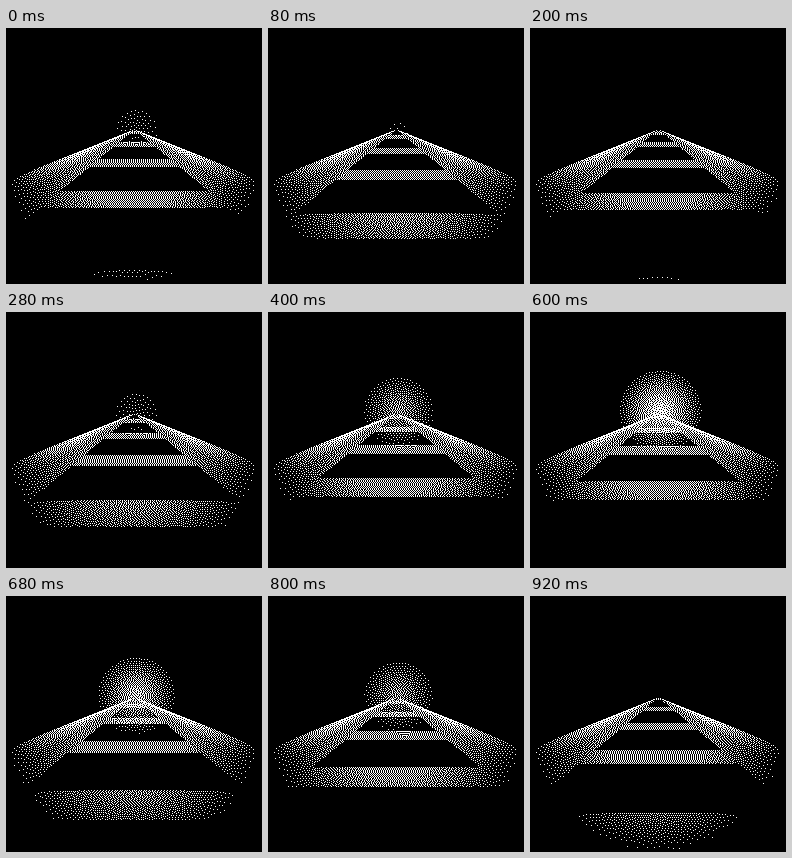
An HTML page with a canvas for the animation above (960 ms loop, 256 by 256 pixels).

```html
<!DOCTYPE html>
<html lang="en">
<head>
<meta charset="utf-8">
<title>Night track</title>
<style>
  html, body { margin: 0; width: 100%; height: 100%; overflow: hidden; background: #000; }
  canvas { display: block; width: 100vw; height: 100vh; image-rendering: pixelated; }
</style>
</head>
<body>
<canvas id="stage" width="256" height="256"></canvas>
<script>
const SIZE = 256, LOOP = 960, STEP = 40;
const ctx = document.getElementById("stage").getContext("2d");
const image = ctx.createImageData(SIZE, SIZE);
const pixels = new Uint32Array(image.data.buffer);
const BLACK = 0xff000000, WHITE = 0xffffffff;

// Lamp brightness as [ms, level]
const LAMP = [[0, .12], [120, 0], [240, 0], [400, .5], [480, .88], [600, .88],
              [680, .7], [800, .48], [920, 0], [960, .12]];

const clamp = v => Math.max(0, Math.min(1, v));

function lampLevel(ms) {
  const i = LAMP.findIndex(key => key[0] > ms);
  const [t0, a] = LAMP[i - 1], [t1, b] = LAMP[i];
  return a + (b - a) * (ms - t0) / (t1 - t0);
}

// Brightness of the ground: two fans of rails with sleepers between them
function ground(x, y, phase) {
  if (y <= 101) return 0;
  const fade = clamp((130 - Math.hypot(x - 127, y - 126)) / 75);
  const slope = (y - 101) / Math.abs(x - 128);
  if (slope < .4) return 0;
  if (slope < .835) return fade * Math.max(.43, .9 - (slope - .4) * 2.4);
  const depth = phase - 256 / (y - 55);
  return depth - Math.floor(depth) < .33 ? fade * .5 : 0;
}

function brightness(x, y, phase, lamp) {
  const radius = 46 * lamp ** .25;
  const glow = lamp && lamp * clamp(1 - Math.hypot(x - 130, y - 98) / radius);
  return 1 - (1 - ground(x, y, phase)) * (1 - glow);
}

// Stipple the light in pure black and white by spreading the rounding error,
// row by row in alternating directions
function draw(ms) {
  const phase = .39 - 5 * ms / LOOP, lamp = lampLevel(ms);
  let row = new Float32Array(SIZE + 2);
  for (let y = 0; y < SIZE; y++) {
    const next = new Float32Array(SIZE + 2);
    const dir = y % 2 ? -1 : 1;
    for (let i = 0; i < SIZE; i++) {
      const x = dir > 0 ? i : SIZE - 1 - i, cell = x + 1;
      const light = brightness(x, y, phase, lamp);
      const value = light + row[cell];
      const on = light > 0 && value > .5;
      const error = light > 0 ? value - on : 0;
      pixels[y * SIZE + x] = on ? WHITE : BLACK;
      row[cell + dir] += error * 7 / 16;
      next[cell - dir] += error * 3 / 16;
      next[cell] += error * 5 / 16;
      next[cell + dir] += error / 16;
    }
    row = next;
  }
  ctx.putImageData(image, 0, 0);
}

let shown = -1;
function tick() {
  const ms = Math.floor(performance.now() % LOOP / STEP) * STEP;
  if (ms !== shown) draw(shown = ms);
  requestAnimationFrame(tick);
}
tick();
</script>
</body>
</html>
```
